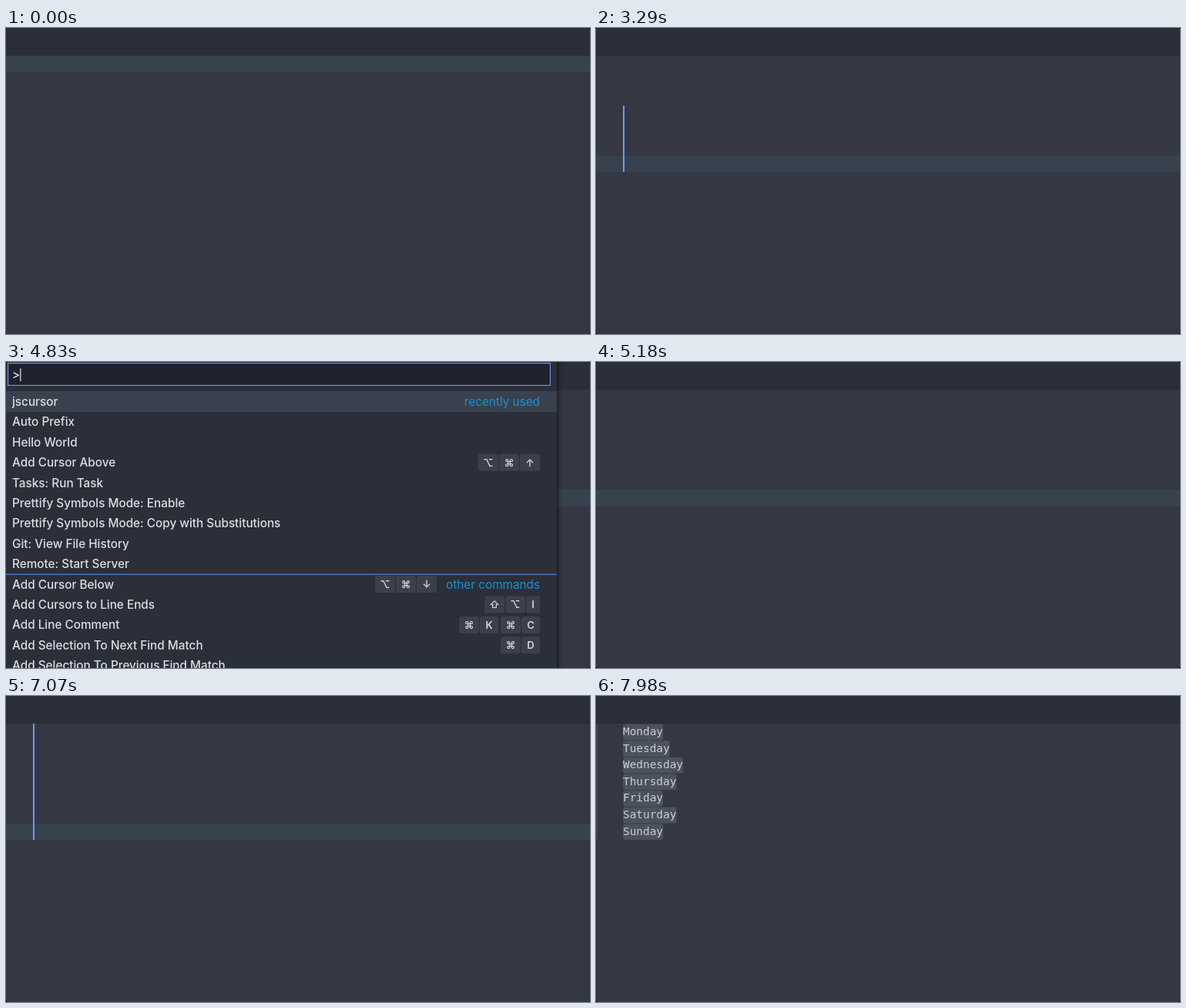
These frames come from a looping animation (758 by 398 pixels, 8000 ms). An HTML page:

```html
<!DOCTYPE html>
<html lang="en">
<head>
<meta charset="utf-8">
<title>Multiple cursors</title>
<style>
html, body { margin: 0; width: 100%; height: 100%; overflow: hidden; background: #1d1f29; }
svg { display: block; width: 758px; height: 398px; }
text { white-space: pre; }
.ui { font: 500 15.3px Inter, "Open Sans", sans-serif; font-variant-ligatures: none; font-feature-settings: "calt" 0; fill: #dcdee2; }
.hint { font-weight: 400; fill: #1c8fd1; text-anchor: end; }
.key { font: 600 13px Inter, "DejaVu Sans", sans-serif; fill: #d5d7db; text-anchor: middle; }
.code { font: 14.4px "DejaVu Sans Mono", monospace; fill: #cbced4; }
.panel { fill: #2b2f39; filter: drop-shadow(0 3px 3px #000); }
</style>
</head>
<body>
<svg id="stage" viewBox="0 0 758 398"></svg>
<script>
const LOOP = 8000, TOP = 36, LINE = 21.6, LEFT = 35, CHAR = 8.67, ROW = 26.4;
const stage = document.getElementById('stage');

function add(parent, tag, attrs, content) {
  const el = document.createElementNS('http://www.w3.org/2000/svg', tag);
  for (const name in attrs) el.setAttribute(name, attrs[name]);
  if (content) el.textContent = content;
  parent.append(el);
  return el;
}
const group = parent => add(parent, 'g', {});
const rect = (parent, x, y, width, height, fill, rx = 0) =>
  add(parent, 'rect', { x, y, width, height, fill, rx });
const label = (parent, x, y, content, cls = 'ui') =>
  add(parent, 'text', { x, y, class: cls }, content);
const show = (el, on) => el.setAttribute('visibility', on ? 'inherit' : 'hidden');
const lineY = i => Math.round(TOP + i * LINE);

// Editor
rect(stage, 0, 0, 758, 398, '#353842', 4);
add(stage, 'path', { d: 'M0 36V4a4 4 0 0 1 4-4h750a4 4 0 0 1 4 4v32z', fill: '#2b2e39' });
const activeLine = rect(stage, 0, TOP, 758, 21.5, '#38424f');
const gutter = rect(stage, 1, TOP, 1, 151, '#4a515d');
const words = group(stage);
const days = ['Mon', 'Tues', 'Wednes', 'Thurs', 'Fri', 'Satur', 'Sun'].map(d => d + 'day');
days.forEach((day, i) => {
  const y = TOP + i * LINE;
  rect(words, LEFT, y + 0.6, day.length * CHAR, 20.8, '#4b515d', 3);
  label(words, LEFT, y + 15, day, 'code');
});
const cursors = days.map((_, i) => rect(stage, LEFT, lineY(i), 2, lineY(i + 1) - lineY(i), '#6b9cf6'));

// Command palette
const palette = group(stage);
const panel = add(palette, 'rect', { x: -8, y: -8, width: 723, class: 'panel' });
rect(palette, 0, 38, 715, 27, '#39424e');
add(palette, 'rect', { x: 2.6, y: 1.6, width: 703.8, height: 28.8, fill: '#1f212d', stroke: '#5f93ee', 'stroke-width': 1.2 });
const entry = label(palette, 8, 22, '');
const caret = rect(palette, 0, 8.5, 1.2, 16.5, '#e4e5e8');
const prompt = label(palette, 8, 57, "Press 'Enter' to confirm your input or 'Escape' to cancel");

const list = group(palette);
const commands = [
  'jscursor', 'Auto Prefix', 'Hello World', 'Add Cursor Above', 'Tasks: Run Task',
  'Prettify Symbols Mode: Enable', 'Prettify Symbols Mode: Copy with Substitutions',
  'Git: View File History', 'Remote: Start Server', 'Add Cursor Below',
  'Add Cursors to Line Ends', 'Add Line Comment', 'Add Selection To Next Find Match',
  'Add Selection To Previous Find Match'
];
commands.forEach((name, i) => label(list, 8, 57 + i * ROW, name));
rect(list, 0, 275.6, 715, 1.2, '#5084dc');
label(list, 693, 57, 'recently used', 'ui hint');
label(list, 693, 57 + 9 * ROW, 'other commands', 'ui hint');

// Each chord lists its row, right edge and keys
const chords = [[3, 693, '⌥⌘↑'], [9, 559, '⌥⌘↓'], [10, 693, '⇧⌥I'], [11, 639, '⌘K'], [11, 693, '⌘C'], [12, 693, '⌘D']];
const keyWidth = key => key === 'I' ? 18 : /[A-Z]/.test(key) ? 24 : 26;
for (const [row, right, keys] of chords) {
  let x = right;
  const y = 51.5 + row * ROW;
  for (const key of [...keys].reverse()) {
    const w = keyWidth(key);
    x -= w;
    rect(list, x, y - 11, w, 22, '#3b404b', 3);
    label(list, x + w / 2, y + 4.8, key, 'key');
    x -= 1;
  }
}

// Event times in ms
const enterTimes = [1400, 1680, 1890, 2030, 2100, 2240];
const splitTimes = [3010, 3150, 3290, 3430, 3570, 3710];
const typeTimes = [5740, 5880, 5950, 6160, 6230, 6300, 6510, 6580, 6720];
const PREFIX = '(e, i) => ', TYPED = 'getDay(i)';
const INSERT = 7490;
const count = (times, t) => times.filter(at => t >= at).length;
const within = (t, from, to) => t >= from && t < to;

function cursorAlpha(t) {
  if (t < 840) return 0;
  if (t < 1120) return 0.6 + 0.1 * Math.floor((t - 840) / 70);
  if (within(t, 2660, 2730)) return 0.3;
  if (within(t, 2730, 3010) || within(t, 4200, 6930) || t >= 7980) return 0;
  return 1;
}

function draw(t) {
  const line = count(enterTimes, t), inserted = t >= INSERT;
  const first = line - count(splitTimes, t), alpha = cursorAlpha(t);
  activeLine.setAttribute('y', lineY(line));
  show(activeLine, !inserted);
  show(words, inserted);
  gutter.setAttribute('opacity', Math.max(0, Math.min(1, (t - INSERT) / 280)));
  cursors.forEach((cursor, i) => {
    cursor.setAttribute('x', inserted ? LEFT + days[i].length * CHAR : LEFT);
    cursor.setAttribute('opacity', alpha);
    show(cursor, i >= first && i <= line);
  });

  const listing = within(t, 4830, 5180), asking = within(t, 5250, 6790);
  show(palette, listing || asking);
  show(list, listing);
  show(prompt, asking);
  panel.setAttribute('height', listing ? 430 : 80);
  entry.textContent = listing ? '>' : PREFIX + TYPED.slice(0, count(typeTimes, t));
  caret.setAttribute('x', 8 + entry.getComputedTextLength());
}

const start = performance.now();
function tick() {
  draw((performance.now() - start) % LOOP);
  requestAnimationFrame(tick);
}
tick();
</script>
</body>
</html>
```
